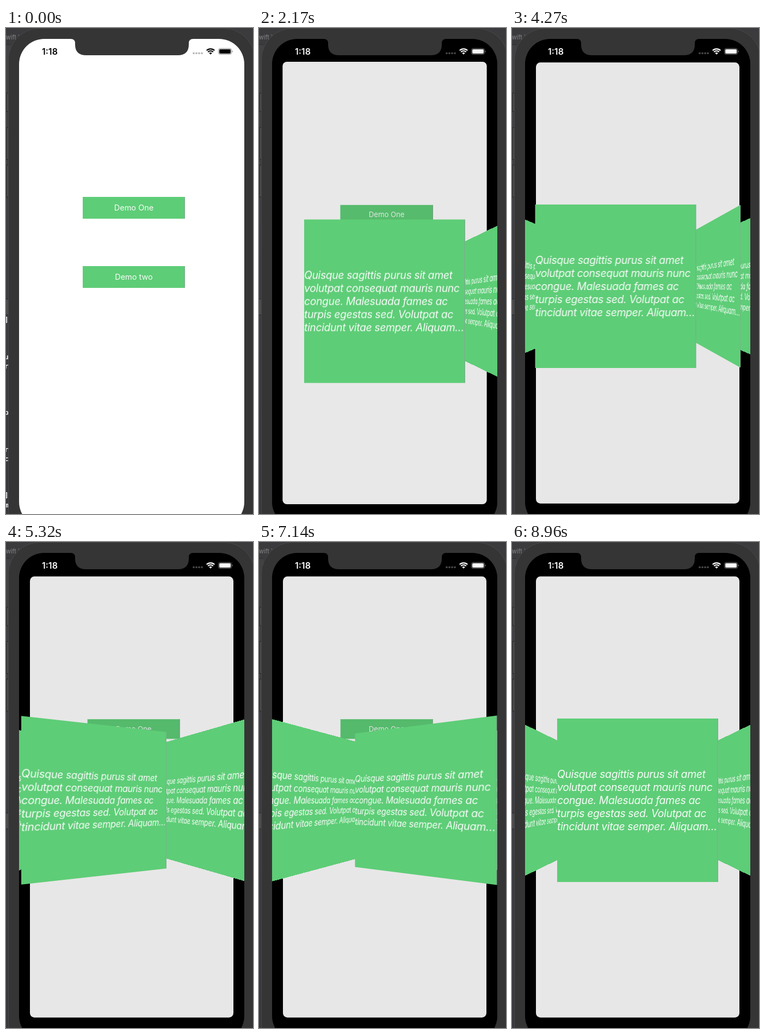
These frames come from a looping animation (454x892 px, 9.03 s). An HTML page:

```html
<!DOCTYPE html>
<html lang="en">
<head>
<meta charset="utf-8">
<title>Cover flow demo</title>
<style>
  html, body { margin: 0; width: 100%; height: 100%; overflow: hidden; background: #3b3b3e; }
  div, svg, span { position: absolute; box-sizing: border-box; }
  #stage { left: 0; top: 0; width: 454px; height: 892px; overflow: hidden; background: #3b3b3e;
    font-family: Inter, "Liberation Sans", sans-serif; }
  #editor { left: 0; top: 30px; width: 8px; height: 862px; background: linear-gradient(#424244, #3b3b42 50%, #37373d); border-top: 1px solid #2c2c2e; }
  #band { left: 0; top: 497px; width: 8px; height: 30px; background: #4b4b4d; border: solid #252527; border-width: 1px 0; }
  #tab { left: -6px; top: 10px; font-size: 11px; line-height: 14px; color: #858587; white-space: pre; }
  .code { left: -3px; font: bold 13px/16px "DejaVu Sans Mono", monospace; color: #eee; }
  .key { left: 0; width: 8px; background: #474747; border: 1px solid #232323; border-radius: 2px 0 0 2px; }
  #phone { left: 4px; top: 0; width: 454px; height: 960px; border-radius: 58px; background: #353535; border: 1px solid #484848; }
  #screen { left: 0; top: 0; width: 454px; height: 916px; background: #000; clip-path: inset(20px 16px 0 24px round 46px); }
  #page { left: 24px; top: 20px; width: 414px; height: 896px; background: #fff; overflow: hidden; }
  #dim { inset: 0; background: #000; }
  .button, .card { background: #5ecd77; box-shadow: inset -2px 0 #73b787; color: #f7fbf8; white-space: nowrap; }
  .button { left: 117px; width: 188px; height: 40px; font-size: 14.5px; line-height: 40px; text-align: center; }
  #deck { left: 0; top: 0; width: 454px; height: 916px; }
  .card { left: 83px; top: 324px; width: 296px; height: 300px; padding-top: 91px;
    font-size: 19.4px; font-style: italic; line-height: 23.9px; letter-spacing: -.37px; }
  #overlay { left: 0; top: 0; }
</style>
</head>
<body>
<div id="stage">
  <div id="editor"></div>
  <div id="band"></div>
  <span id="tab">swift 〉</span>
  <div id="phone"></div>
  <div id="screen">
    <div id="page">
      <div class="button" style="top:290px">Demo One</div>
      <div class="button" style="top:417px">Demo two</div>
      <div id="dim"></div>
    </div>
    <div id="deck"></div>
  </div>
  <svg id="overlay" width="454" height="892">
    <path fill="#353535" d="M119 19V20Q127 20 127 28V30Q127 50 147 50H316Q336 50 336 30V28Q336 20 344 20V19Z"/>
    <g id="status">
      <text x="66" y="48.5" font-size="16" font-weight="600">1:18</text>
      <g opacity=".28">
        <circle cx="345" cy="46.3" r="1.9"/><circle cx="350" cy="46.3" r="1.9"/>
        <circle cx="355" cy="46.3" r="1.9"/><circle cx="360" cy="46.3" r="1.9"/>
      </g>
      <path fill="none" stroke="currentColor" stroke-width="2.2" d="M368.8 41.2a10.4 10.4 0 0 1 14.4 0M371.2 44a6.8 6.8 0 0 1 9.6 0"/>
      <path d="M373.4 46.2a3.6 3.6 0 0 1 5.2 0L376 48.8z"/>
      <rect x="390.5" y="37.5" width="24" height="11" rx="3.5" fill="none" stroke="currentColor" opacity=".45"/>
      <rect x="392" y="39" width="21" height="8" rx="2"/>
      <path opacity=".45" d="M415.6 41.2q1.4.5 1.4 1.8t-1.4 1.8z"/>
    </g>
  </svg>
</div>
<script>
const LOOP = 9030, STEP = 70;
const CARDS = 5, WIDTH = 296, TILT = 0.9, SPACING = 0.25;
const TEXT = ["Quisque sagittis purus sit amet", "volutpat consequat mauris nunc",
  "congue. Malesuada fames ac", "turpis egestas sed. Volutpat ac", "tincidunt vitae semper. Aliquam…"];

// time, scroll position, tilt position (which card faces the viewer)
const SCROLL = [
  [3080, 0, 0], [3500, .5, 0], [3800, 1, 1], [4060, 1.25, 1], [4270, 1.547, 1],
  [4550, 2, 2], [4900, 3, 3], [5110, 2.6, 3], [5320, 2.307, 2.28], [5500, 2, 2],
  [5800, 3, 3], [6020, 4, 4], [6300, 4.83, 5], [6700, 4, 4], [7200, 2.5, 2.5],
  [7620, 1.45, 1], [7840, 1.844, 1.83], [8050, 2, 2], [8260, 2.3, 2], [8820, 3, 3]
];

const $ = id => document.getElementById(id);
const clamp = (v, lo, hi) => Math.min(hi, Math.max(lo, v));

function add(parent, className, text, style) {
  const el = document.createElement("div");
  el.className = className;
  el.innerHTML = text;
  Object.assign(el.style, style);
  parent.append(el);
  return el;
}

const letter = ([text, top]) => add($("editor"), "code", text, { top: top - 39 + "px" });
const early = [["]", 536], ["u", 604], ["r", 621]].map(letter);
const late = [["p", 706], ["r", 774], ["c", 791], ["]", 858], ["m", 876]].map(letter);
for (const [top, height] of [[119, 35], [182, 60], [251, 60]])
  add($("editor"), "key", "", { top: top - 31 + "px", height: height + "px" });
const cards = Array.from({ length: CARDS }, () => add($("deck"), "card", TEXT.join("<br>")));

function scrollAt(t) {
  const next = SCROLL.findIndex(key => key[0] > t);
  if (next < 0) return SCROLL.at(-1).slice(1);
  if (next === 0) return [0, 0];
  const a = SCROLL[next - 1], b = SCROLL[next];
  const u = (t - a[0]) / (b[0] - a[0]);
  return [1, 2].map(i => a[i] + (b[i] - a[i]) * u);
}

// Critically damped spring
function presented(t) {
  const s = 0.026 * Math.max(0, t - 1965);
  return 1 - (1 + s) * Math.exp(-s);
}

function draw(t) {
  early.forEach(el => el.hidden = t >= 140);
  late.forEach(el => el.hidden = t >= 1750);

  const k = presented(t);
  $("page").style.transform = `scale(${1 - 0.0966 * k})`;
  $("page").style.borderRadius = 9 * k + "px";
  $("dim").style.opacity = 0.095 * k;
  const shade = Math.round(255 * k);
  $("status").style.color = $("status").style.fill = `rgb(${shade},${shade},${shade})`;

  $("deck").style.transform = `translateY(${896 * (1 - k)}px)`;
  const [position, facing] = scrollAt(t);
  cards.forEach((card, i) => {
    const turn = clamp(i - facing, -1, 1);
    const x = (turn * TILT / 2 + (i - position) * SPACING) * WIDTH;
    const z = -Math.abs(turn) * WIDTH / 2;
    card.style.transform = `perspective(500px) translate3d(${x}px,0,${z}px) rotateY(${-turn * TILT * 90}deg)`;
    card.style.zIndex = 99 - Math.round(9 * Math.abs(i - facing));
  });
}

const start = performance.now();
function tick() {
  const t = (performance.now() - start) % LOOP;
  draw(Math.floor(t / STEP) * STEP);
  requestAnimationFrame(tick);
}
tick();
</script>
</body>
</html>
```
